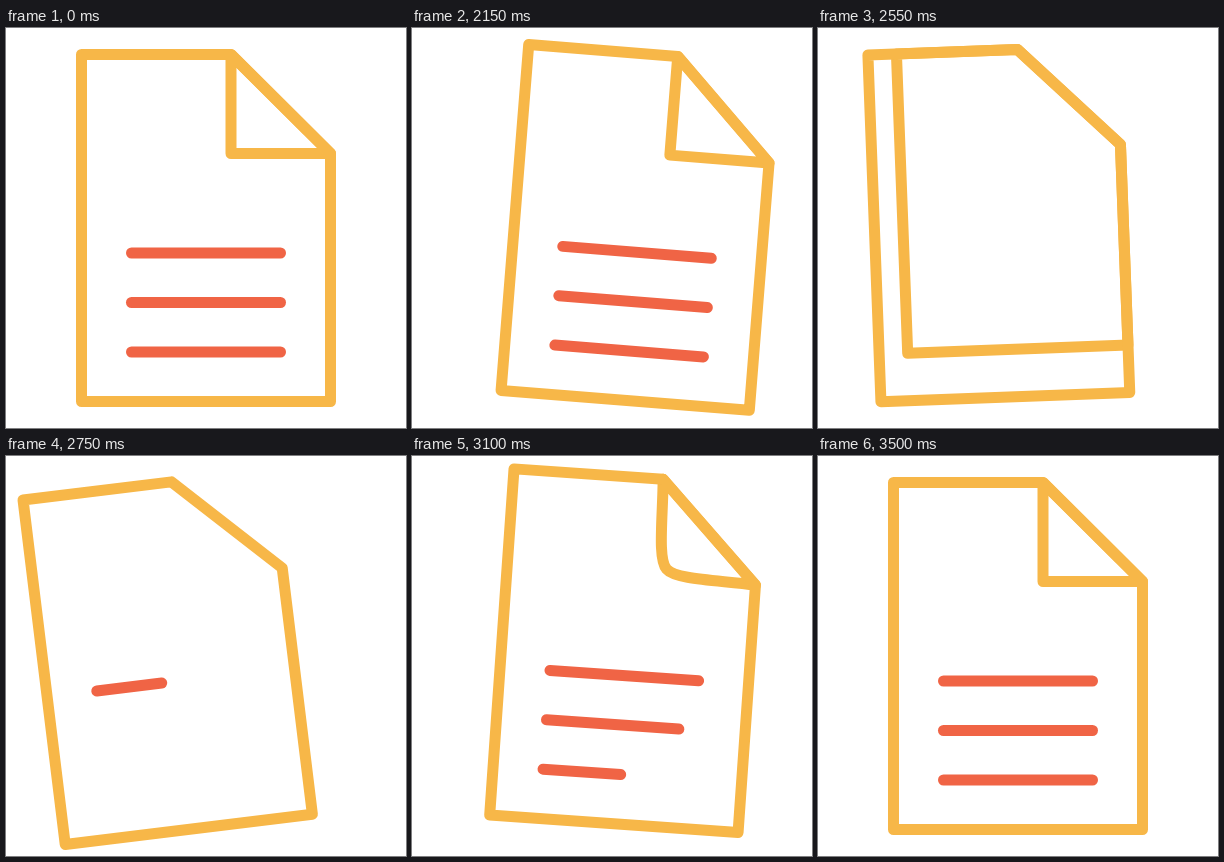
An HTML page that plays this animation: 400x400 px, repeating every 3520 ms.

```html
<!DOCTYPE html>
<html lang="en">
<head>
<meta charset="utf-8">
<title>Document</title>
<style>
  html, body { margin: 0; width: 100%; height: 100%; overflow: hidden; background: #fff; }
  svg { display: block; width: 100%; height: 100%; }
  path { stroke-width: 11; stroke-linecap: round; stroke-linejoin: round; }
  .line { fill: none; stroke: #f06445; }
  .page { fill: none; stroke: #f7b748; }
  #fold { fill: #fff; }
</style>
</head>
<body>
<svg viewBox="0 0 400 400">
  <g id="doc">
    <path class="line"/>
    <path class="line"/>
    <path class="line"/>
    <path class="page" id="fold"/>
    <path class="page" d="M75.5 26.5H225L324.5 125.5V373.5H75.5Z"/>
  </g>
</svg>
<script>
const LOOP = 3520;
const FLIP = 2327, FLIP_END = 2638, FOLD = 2850;

// time, x, y, angle
const KEYS = [
  [1986, 0, 0, 0],
  [2320, 55, -1.7, 9.3],
  [2370, 51, -2, 8.5],
  [2520, -12.5, -4, -0.1],
  [2550, -19, -4.3, -2.1],
  [2685, -37.3, 1.7, -7.8],
  [2750, -38.3, 1.1, -7],
  [3070, 11.8, -4.9, 3.4],
  [3100, 14, -5.3, 4],
  [3160, 16, -7.8, 5],
  [3495, 0, 0, 0]
];

const doc = document.getElementById('doc');
const fold = document.getElementById('fold');
const lines = document.querySelectorAll('.line');

const mix = (a, b, p) => a + (b - a) * p;
const span = (t, start, length) => Math.min(1, Math.max(0, (t - start) / length));
const smooth = p => p * p * (3 - 2 * p);
const easeOut = p => 1 - (1 - p) ** 2;

function slope(i, c) {
  const a = KEYS[i], b = KEYS[i + 1];
  return a && b ? (b[c] - a[c]) / (b[0] - a[0]) : 0;
}

function tangent(i, c) {
  const l = slope(i - 1, c), r = slope(i, c);
  return l * r > 0 ? 2 * l * r / (l + r) : 0;
}

// Monotone cubic through the keys
function sample(t, c) {
  const n = KEYS.length - 1;
  if (t <= KEYS[0][0] || t >= KEYS[n][0]) return 0;
  let i = 0;
  while (t > KEYS[i + 1][0]) i++;
  const a = KEYS[i], b = KEYS[i + 1], d = b[0] - a[0], p = (t - a[0]) / d, q = 1 - p;
  return mix(a[c], b[c], smooth(p)) + d * p * q * (q * tangent(i, c) - p * tangent(i + 1, c));
}

// Corner peels down to the bottom left of the page
function peel(p) {
  const x = mix(225, 75.5, p), y = mix(125.5, 373.5, p);
  return `M225 26.5H${x}V${y}H324.5V125.5Z`;
}

// New corner swells out of the diagonal
function swell(u) {
  const x = mix(274.75, 225, u), y = mix(76, 125.5, u);
  const near = 12 * (1 - u), far = mix(12, 45, u), h = 50 * (1 - u);
  return `M225 26.5C${225 + near} ${26.5 + far} ${x - h} ${y - h} ${x} ${y}` +
    `C${x + h} ${y + h} ${324.5 - far} ${125.5 - near} 324.5 125.5Z`;
}

function draw(t) {
  const x = sample(t, 1), y = sample(t, 2), angle = sample(t, 3);
  doc.setAttribute('transform', `translate(${x} ${y}) rotate(${angle} 200 200)`);

  let d = '';
  if (t < FLIP_END) d = peel(smooth(span(t, FLIP, FLIP_END - FLIP)));
  else if (t > FOLD) d = swell(easeOut(span(t, FOLD, 450)));
  fold.setAttribute('d', d);

  lines.forEach((line, i) => {
    const p = t < FLIP_END ? 1 : easeOut(span(t, FLIP_END + 162 * i, 450));
    line.setAttribute('d', p ? `M125.5 ${225 + 49.5 * i}h${149 * p}` : '');
  });
}

const begin = performance.now();
function tick() {
  draw((performance.now() - begin) % LOOP);
  requestAnimationFrame(tick);
}
tick();
</script>
</body>
</html>
```
